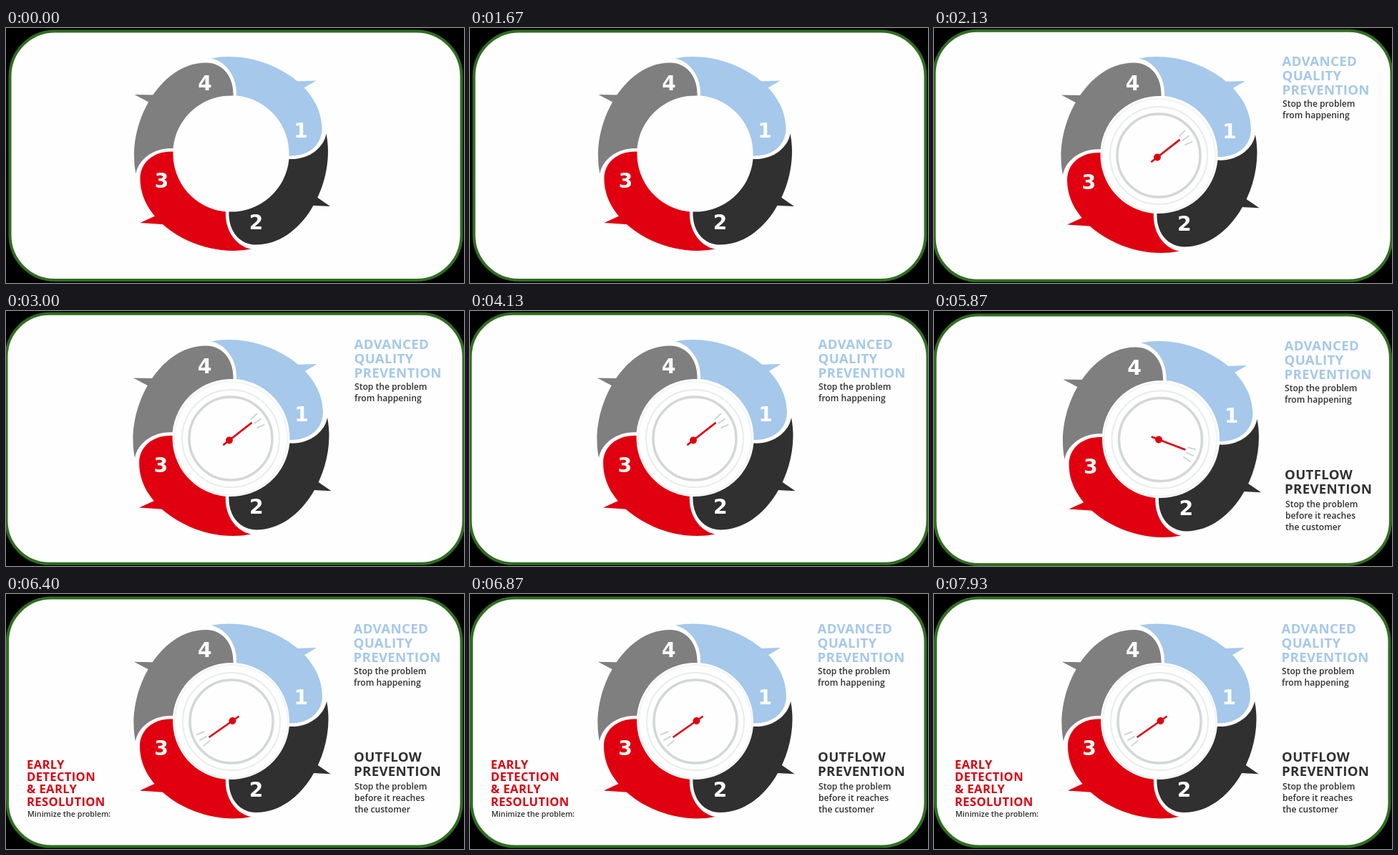
Recreate the animation shown at these times as an HTML page. Size 640x356 px, loop 8 s.

```html
<!DOCTYPE html>
<html lang="en">
<head>
<meta charset="utf-8">
<title>Quality cycle</title>
<style>
html, body { margin: 0; width: 100%; height: 100%; overflow: hidden; background: #000; }
svg { display: block; width: 100%; height: 100%; }
text { font-family: "Open Sans", "Noto Sans", sans-serif; white-space: pre; }
.head { font-weight: 700; letter-spacing: .35px; }
.body { font-weight: 600; }
.digit { font: 700 28px "DejaVu Sans", sans-serif; fill: #fff; text-anchor: middle; }
</style>
</head>
<body>
<svg id="stage" viewBox="0 0 640 356"></svg>
<script>
const BLUE = '#a5c8eb', DARK = '#303030', RED = '#e0000f', GRAY = '#7f7f7f';
const DURATION = 8000;

// One blade, repeated at quarter turns; each has its own pointer and digit.
const BLADE = 'M7.5-81C9-109-9-130-28-133C40-147 127-100 127-35C127-12 108 4 81 3A81 81 0 0 0 7.5-81Z';
const blades = [
  { color: BLUE, pointer: '85,-85 87,-101 119,-102 102,-92', digit: [97.5, -33] },
  { color: DARK, pointer: '95,60 119,60 138.5,73.5 109,72', digit: [35, 95] },
  { color: RED, pointer: '-85,85 -104,86 -127,96.5 -90,99', digit: [-97, 37] },
  { color: GRAY, pointer: '-95,-70 -105,-82 -135,-82.5 -115,-72', digit: [-36.5, -99] }
];

const wheel = (x, y, scale) => `<g transform="translate(${x} ${y}) scale(${scale})">` +
  blades.map(({ color, pointer, digit: [dx, dy] }, i) =>
    `<path d="${BLADE}" transform="rotate(${i * 90})" fill="${color}"/>
     <polygon points="${pointer}" fill="${color}"/>
     <text class="digit" x="${dx}" y="${dy + 10}">${i + 1}</text>`).join('') + '</g>';

const gauge = (x, y, hubX, hubY, angle) =>
  `<g fill="none">
    <circle cx="${x}" cy="${y}" r="79" stroke="#f3f4f4" stroke-width="2"/>
    <circle cx="${x}" cy="${y}" r="68" stroke="#e9ecec" stroke-width="2"/>
    <circle cx="${x}" cy="${y}" r="58" stroke="#d2d7d8" stroke-width="3.5"/>
  </g>
  <g transform="translate(${hubX} ${hubY}) rotate(${angle})">
    <path d="M-11 0H40" stroke="${RED}" stroke-width="2.6"/>
    <circle r="5" fill="${RED}"/>` +
    [-6, 4, 14].map(a =>
      `<path d="M42 0H54" transform="rotate(${a})" stroke="#cdd1d2" stroke-width="1.8"/>`).join('') +
  '</g>';

const lines = (kind, x, y, step, size, color, rows) => rows.map((row, i) =>
  `<text class="${kind}" x="${x}" y="${y + i * step}" font-size="${size}" fill="${color}">${row}</text>`).join('');

const advanced = (x, y) =>
  lines('head', x, y, 20, 18.6, BLUE, ['ADVANCED', 'QUALITY', 'PREVENTION']) +
  lines('body', x + .5, y + 57, 16, 12.1, DARK, ['Stop the problem', 'from happening']);

const outflow = (x, y) =>
  lines('head', x, y, 20, 18.6, DARK, ['OUTFLOW', 'PREVENTION']) +
  lines('body', x + 1, y + 39, 16.2, 12.1, DARK, ['Stop the problem', 'before it reaches', 'the customer']);

const early = (x, y) =>
  lines('head', x, y, 17.4, 16.6, RED, ['EARLY', 'DETECTION', '&amp; EARLY', 'RESOLUTION']) +
  lines('body', x + 1, y + 67.5, 0, 10.7, DARK, ['Minimize the problem:']);

const card = (x, y, w, h, r) =>
  `<rect x="${x}" y="${y}" width="${w}" height="${h}" rx="${r}" fill="#fefefe" stroke="#2f6e1f" stroke-width="4"/>`;

const scenes = [
  { start: 0, art: card(5.5, 4.5, 631, 347.5, 63) + wheel(314.5, 175.5, 1) },
  { start: 2130, art: card(.5, 3.8, 639, 349, 60) + wheel(314.5, 177, 1.011) +
      gauge(314, 178, 312, 180.5, -38) + advanced(486.5, 53) },
  { start: 4330, art: card(1.5, 5.5, 636.5, 348.5, 61) + wheel(317, 179, 1.011) +
      gauge(316.5, 179.5, 314, 179.5, 21) + advanced(489.5, 55) + outflow(490, 234.5) },
  { start: 6400, art: card(2, 5.6, 634.5, 347, 61) + wheel(314.5, 177.5, 1.004) +
      gauge(315, 178, 316.5, 177, 145) + advanced(485.5, 55) + outflow(486, 233.5) + early(29, 243.5) }
];

const stage = document.getElementById('stage');
stage.innerHTML = scenes.map(s => `<g>${s.art}</g>`).join('');
const groups = [...stage.children];

function draw() {
  const t = performance.now() % DURATION;
  const current = scenes.filter(s => s.start <= t).length - 1;
  groups.forEach((g, i) => g.style.display = i === current ? '' : 'none');
  requestAnimationFrame(draw);
}
draw();
</script>
</body>
</html>
```
